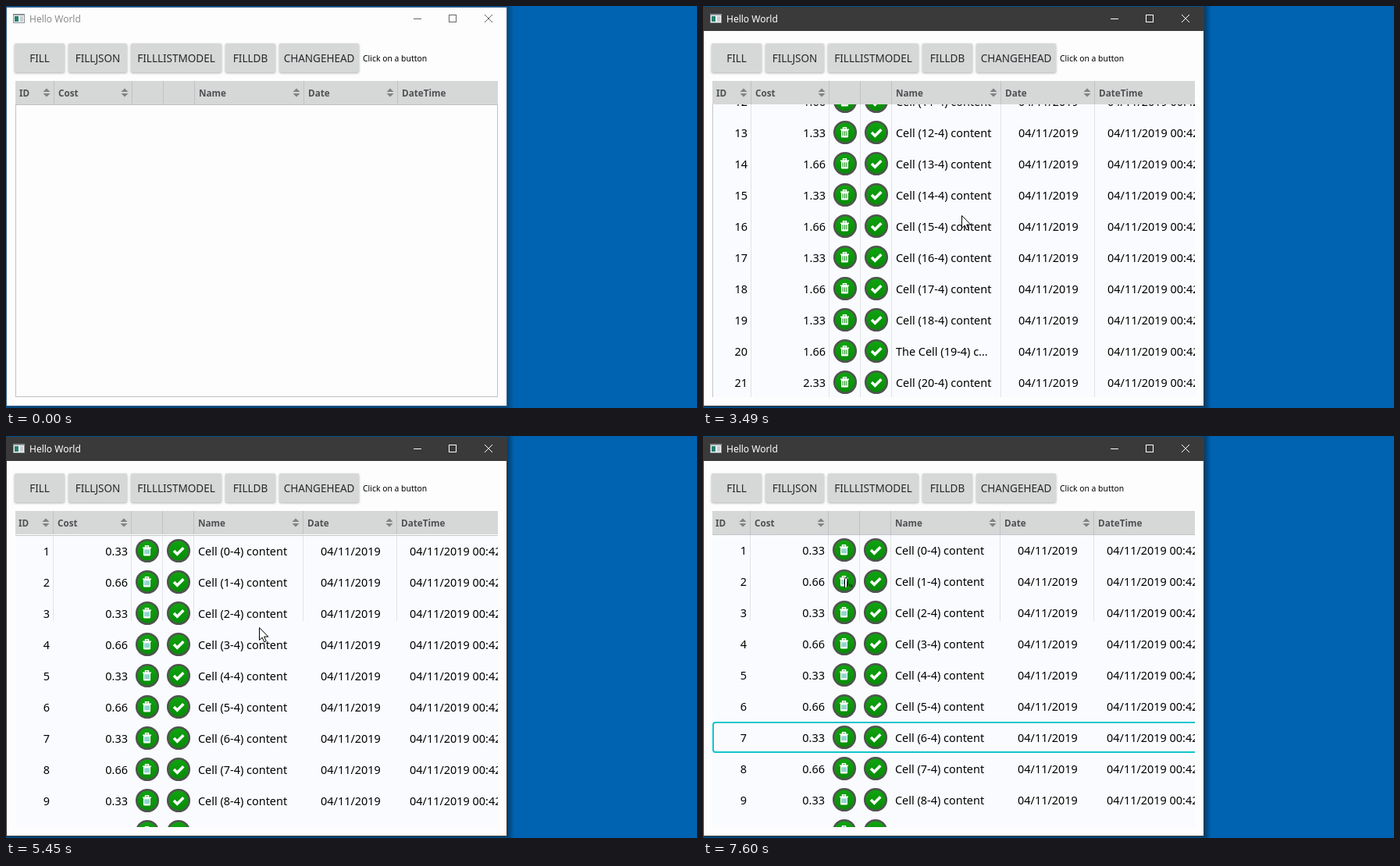
Animation, 885 px wide and 515 px high, one loop 8000 ms. Source, as an HTML page with a canvas:

```html
<!DOCTYPE html>
<html lang="en">
<head>
<meta charset="utf-8">
<title>Hello World</title>
<style>
  html, body { margin: 0; width: 100%; height: 100%; overflow: hidden; background: #0063b1; }
  canvas { display: block; width: 885px; height: 515px; }
</style>
</head>
<body>
<canvas id="stage" width="885" height="515"></canvas>
<script>
const ctx = document.getElementById('stage').getContext('2d');
const LOOP = 8000;
const ACTIVATE = 1240, FILL = 1530, SCROLL = 2130, SHIFT = 5380;

// Screen updates: [first, last, count]; the picture holds between them.
const bursts = [
  [280, 1020, 11], [1100, 1100, 1], [1240, 1240, 1], [1530, 1530, 1], [1770, 1990, 4],
  [2130, 2790, 10], [3020, 3020, 1], [3490, 3870, 6], [4020, 4400, 6], [4790, 5530, 11],
  [5610, 5890, 5], [6200, 6200, 1], [6340, 6560, 4], [6780, 7080, 5], [7240, 7240, 1],
  [7380, 7600, 4]
];
const updates = bursts.flatMap(([first, last, n]) =>
  Array.from({ length: n }, (_, i) =>
    Math.floor((first + (n > 1 ? (last - first) * i / (n - 1) : 0)) / 10) * 10));

const pointerPath = [
  [280, 590, 497], [500, 480, 330], [800, 345, 120], [940, 307, 63], [1020, 311, 69],
  [1240, 312, 66], [1700, 312, 66], [1770, 311, 100], [1990, 338, 360], [2060, 338, 360],
  [2280, 332, 256], [3420, 332, 256], [3490, 331, 268], [3560, 330, 297], [3870, 316, 205],
  [3950, 316, 205], [4170, 330, 300], [4400, 331, 225], [4720, 331, 225], [4940, 334, 263],
  [5080, 334, 263], [5460, 324, 245], [6270, 324, 245], [6560, 322, 294], [6780, 322, 294],
  [7080, 326, 366], [7310, 326, 366], [7600, 180, 181]
];
const scrollPath = [
  [2060, 0], [2200, 60], [2350, 205], [2490, 314], [2640, 425], [2790, 460], [3020, 464],
  [3950, 464], [4170, 400], [4400, 340], [4720, 340], [5010, 245], [5160, 150], [5380, 20],
  [5530, -25], [5610, -18], [5750, -2.4], [5890, 0]
];

function follow(path, t, part = 1) {
  const next = path.findIndex(key => key[0] > t);
  if (next === 0) return path[0][part];
  if (next < 0) return path[path.length - 1][part];
  const a = path[next - 1], b = path[next];
  return a[part] + (b[part] - a[part]) * (t - a[0]) / (b[0] - a[0]);
}

function box(x, y, w, h, color) {
  ctx.fillStyle = color;
  ctx.fillRect(x, y, w, h);
}

function label(text, x, y, size, color = '#000', align = 'left', weight = 400) {
  ctx.font = `${weight} ${size}px "Noto Sans", sans-serif`;
  ctx.textAlign = align;
  ctx.fillStyle = color;
  ctx.fillText(text, x, y);
}

function shape(points, fill, stroke, width = 1) {
  ctx.beginPath();
  points.forEach(([x, y]) => ctx.lineTo(x, y));
  if (fill) {
    ctx.closePath();
    ctx.fillStyle = fill;
    ctx.fill();
  }
  if (stroke) {
    ctx.strokeStyle = stroke;
    ctx.lineWidth = width;
    ctx.stroke();
  }
}

function drawWindow(active) {
  box(0, 0, 885, 515, '#0063b1');
  const shade = ctx.createLinearGradient(641, 0, 651, 0);
  shade.addColorStop(0, `rgba(0,0,0,${active ? 0.42 : 0.28})`);
  shade.addColorStop(1, 'rgba(0,0,0,0)');
  box(641, 0, 10, 515, shade);
  box(0, 513, 642, 2, '#00477f');
  box(0, 0, 642, 1, '#00508f');
  box(0, 1, 642, 512, active ? '#3a3a3a' : '#365f86');
  box(1, active ? 32 : 2, 640, active ? 480 : 510, '#fdfdfd');

  const ink = active ? '#fff' : '#8c8c8c';
  box(9, 10, 15, 12, '#8a9298');
  box(10, 12, 13, 9, '#f4f6f7');
  box(11, 13, 5, 7, '#27806f');
  box(18, 13, 4, 7, '#c8ced1');
  label('Hello World', 30, 21, 12, ink);

  const mark = active ? '#fff' : '#666';
  box(522, 16, 10, 1, mark);
  ctx.strokeStyle = mark;
  ctx.lineWidth = 1;
  ctx.strokeRect(567.5, 11.5, 9, 9);
  shape([[613, 11], [623, 21]], null, mark);
  shape([[623, 11], [613, 21]], null, mark);
}

function drawToolbar(pressed) {
  const buttons = [['FILL', 11, 64], ['FILLJSON', 80, 75], ['FILLLISTMODEL', 160, 116],
    ['FILLDB', 281, 64], ['CHANGEHEAD', 350, 102]];
  for (const [name, x, w] of buttons) {
    ctx.save();
    ctx.shadowColor = 'rgba(0,0,0,.32)';
    ctx.shadowBlur = 3;
    ctx.shadowOffsetY = 1;
    ctx.fillStyle = pressed && name === 'FILLDB' ? '#c6c7c7' : '#d6d7d7';
    ctx.beginPath();
    ctx.roundRect(x, 48, w, 37, 2);
    ctx.fill();
    ctx.restore();
    label(name, x + w / 2, 72, 13.5, '#26282a', 'center');
  }
  label('Click on a button', 457, 71, 10.4);
}

const dividers = [61, 161, 201, 241, 381, 501];

function drawHeader(dx) {
  box(12, 96, 618, 30, '#d6d7d7');
  for (const x of dividers) box(x + dx, 96, 1, 30, '#c0c1c2');
  [['ID', 17], ['Cost', 67], ['Name', 247], ['Date', 387], ['DateTime', 507]]
    .forEach(([name, x]) => label(name, x + dx, 116, 11.7, '#505153', 'left', 700));
  for (const x of [52, 152, 372, 492]) {
    const c = x + dx;
    shape([[c - 4.5, 110], [c, 105.5], [c + 4.5, 110]], '#808284');
    shape([[c - 4.5, 112], [c, 116.5], [c + 4.5, 112]], '#808284');
  }
}

function drawDisc(x, y) {
  const green = ctx.createLinearGradient(0, y - 14, 0, y + 14);
  green.addColorStop(0, '#10a410');
  green.addColorStop(1, '#078a07');
  ctx.beginPath();
  ctx.arc(x, y, 13.8, 0, Math.PI * 2);
  ctx.fillStyle = green;
  ctx.fill();
  ctx.strokeStyle = '#505450';
  ctx.lineWidth = 2.5;
  ctx.stroke();
}

function drawTrash(x, y, bars) {
  drawDisc(x, y);
  ctx.strokeStyle = '#fff';
  ctx.lineWidth = 1.4;
  ctx.strokeRect(x - 2.5, y - 6.3, 4, 2.5);
  box(x - 6, y - 4.5, 11, 1.6, '#fff');
  ctx.beginPath();
  ctx.roundRect(x - 5, y - 4, 9, 10.5, 1.3);
  ctx.fill();
  for (const dx of [-3.4, -1, 1.4]) box(x + dx, y - 1.7, 1.1, 6, bars);
}

function drawCheck(x, y) {
  drawDisc(x, y);
  shape([[x - 6, y], [x - 1.7, y + 4.2], [x + 6.3, y - 3.8]], null, '#fff', 3.5);
}

function drawRow(id, y, dx) {
  const base = y + 5.5;
  const put = (text, x, align) => label(text, x + dx, base, 14.45, '#000', align);
  const cost = Math.floor((id - 1) / 10) + (id % 2 ? 0.33 : 0.66);
  put(id, 57, 'right');
  put(cost.toFixed(2), 157, 'right');
  drawTrash(182 + dx, y, dx ? '#18a79b' : '#149314');
  drawCheck(222 + dx, y);
  put(id === 20 ? 'The Cell (19-4) c...' : `Cell (${id - 1}-4) content`, 247);
  put('04/11/2019', 404);
  put('04/11/2019 00:42:16', 518);
}

function drawTable(t) {
  const filled = t >= FILL, dx = t >= SHIFT ? -1 : 0;
  const offset = follow(scrollPath, t), top = 126 - offset;
  drawHeader(dx);
  if (!filled) {
    ctx.strokeStyle = '#c0c1c2';
    ctx.lineWidth = 1;
    ctx.strokeRect(12.5, 126.5, 617, 374);
    return;
  }
  ctx.save();
  ctx.beginPath();
  ctx.rect(12, 126, 618, 375);
  ctx.clip();
  box(12, 126, 618, 375, t < SCROLL ? '#fff' : '#fafbfe');
  if (offset < 0) box(12, 126, 618, -offset, '#fff');
  if (t < SCROLL) for (let y = 166; y < 501; y += 80) box(12, y, 618, 40, '#f5f7fa');
  const lineEnd = dx ? 237 : 501, lineTop = Math.max(126, top);
  for (const x of dividers) box(x + dx, lineTop, 1, lineEnd - lineTop, '#e2e3e5');
  if (!dx) box(12, 126, 1, 375, '#c5c6c7');
  if (offset <= 0) box(12, Math.floor(top), 618, 1, '#c5c6c8');

  for (let id = Math.max(1, Math.floor(offset / 40)); id < offset / 40 + 11; id++) {
    drawRow(id, top + id * 40 - 20, dx);
  }
  const selected = t >= 7240 ? 7 : t >= 6780 ? 5 : t >= 6200 ? 3 : 0;
  if (selected) {
    ctx.strokeStyle = '#12c5ce';
    ctx.lineWidth = 2;
    ctx.beginPath();
    ctx.roundRect(13, top + selected * 40 - 39, 625, 38, 3);
    ctx.stroke();
  }
  ctx.restore();
}

const arrow = [[0, 0], [0, 16], [3.7, 12.6], [6.2, 18.4], [8.7, 17.3], [6.2, 11.6], [11.3, 11.6]];
const hand = new Path2D('M5 13V2Q5 0 6.7 0T8.4 2V7Q10-0+8 11.5 8Q13 7 14 9Q16 8 16.5 10V16Q16 19 14 23H6Q5 19 1 14Q0 12 1.5 11.5T5 13Z');
const fingers = new Path2D('M8.4 7V11M11.5 8V11.5M14 9V12');

function drawPointer(t) {
  if (t < 280) return;
  const x = follow(pointerPath, t, 1), y = follow(pointerPath, t, 2);
  ctx.save();
  ctx.lineJoin = 'round';
  if (x < 197) {
    ctx.translate(x - 3.5, y + 0.5);
    ctx.fillStyle = '#fff';
    ctx.strokeStyle = '#000';
    ctx.lineWidth = 1;
    ctx.fill(hand);
    ctx.stroke(hand);
    ctx.stroke(fingers);
  } else {
    ctx.translate(Math.round(x) + 0.5, Math.round(y) + 0.5);
    shape([...arrow, arrow[0]], '#fff', '#000');
  }
  ctx.restore();
}

function render(now) {
  const time = now % LOOP;
  const t = updates.reduce((last, u) => u <= time ? u : last, 0);
  drawWindow(t >= ACTIVATE);
  drawToolbar(t >= ACTIVATE && t < 1770);
  drawTable(t);
  drawPointer(t);
}

const start = performance.now();
function tick() {
  render(performance.now() - start);
  requestAnimationFrame(tick);
}
tick();
</script>
</body>
</html>
```
